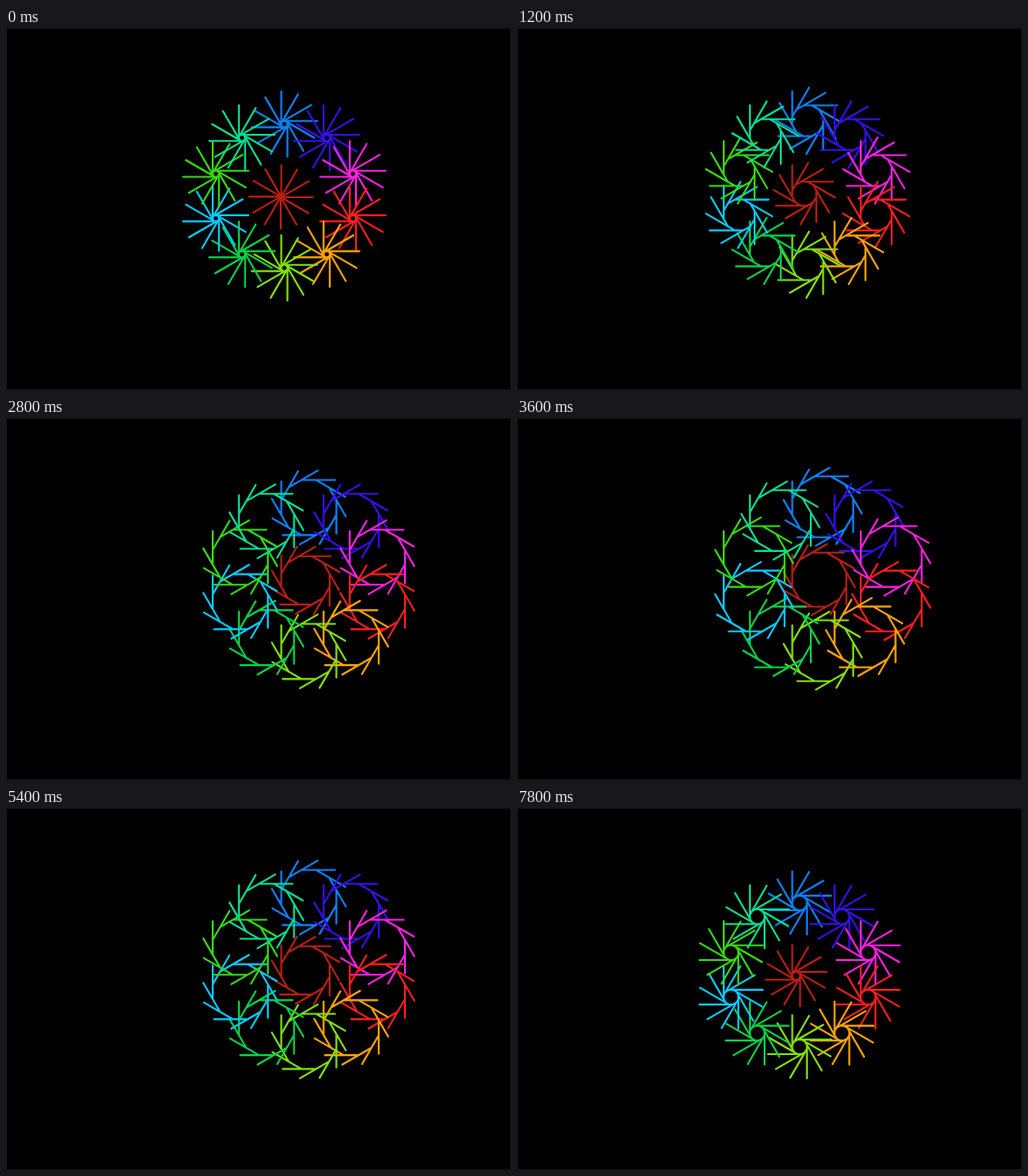
Recreate the animation shown at these times as an HTML page with a canvas. Size 557 px wide and 400 px high, loop 8 s.

```html
<!DOCTYPE html>
<html lang="en">
<head>
<meta charset="utf-8">
<title>Pinwheel ring</title>
<style>
  html, body { margin: 0; width: 100%; height: 100%; overflow: hidden; background: #000; }
  canvas { display: block; }
</style>
</head>
<body>
<canvas id="stage" width="557" height="400"></canvas>
<script>
const ctx = document.getElementById('stage').getContext('2d');
const LOOP = 8000, STEP = 200;
const DEG = Math.PI / 180;
const CENTER = { x: 303.6, y: 186.6 };
const RING_RADIUS = 79.5;
// Clockwise from the top of the ring
const RING_COLORS = ['#0a82fa', '#3510e6', '#fb20e4', '#fb1e1e', '#fca308',
                     '#80e010', '#0ccf48', '#0cc8fa', '#35d810', '#0cdc92'];
const CENTER_COLOR = '#b81e14';

// Turtle walk: draw a spoke, advance by `side`, turn right 30 degrees.
function pinwheel(x, y, length, side, color) {
  ctx.strokeStyle = color;
  ctx.beginPath();
  for (let i = 0; i < 12; i++) {
    const dx = Math.sin(i * 30 * DEG), dy = -Math.cos(i * 30 * DEG);
    ctx.moveTo(x, y);
    ctx.lineTo(x + dx * length, y + dy * length);
    x += dx * side;
    y += dy * side;
  }
  ctx.stroke();
}

function draw(step) {
  const side = 16.3 * Math.cos(4.42 * DEG * (step - 20.5));
  ctx.fillStyle = '#000';
  ctx.fillRect(0, 0, 557, 400);
  ctx.lineWidth = 1;
  ctx.strokeStyle = '#141414';
  ctx.strokeRect(0.5, 0.5, 556, 399);

  ctx.lineWidth = 2.1;
  ctx.lineCap = 'round';
  pinwheel(CENTER.x, CENTER.y, 35, side, CENTER_COLOR);
  RING_COLORS.forEach((color, i) => {
    const angle = i * 36 * DEG;
    pinwheel(CENTER.x + RING_RADIUS * Math.sin(angle),
             CENTER.y - RING_RADIUS * Math.cos(angle), 37, side + 2, color);
  });
}

const start = performance.now();
function tick() {
  const time = (performance.now() - start) % LOOP;
  draw(Math.floor(time / STEP));
  requestAnimationFrame(tick);
}
tick();
</script>
</body>
</html>
```
